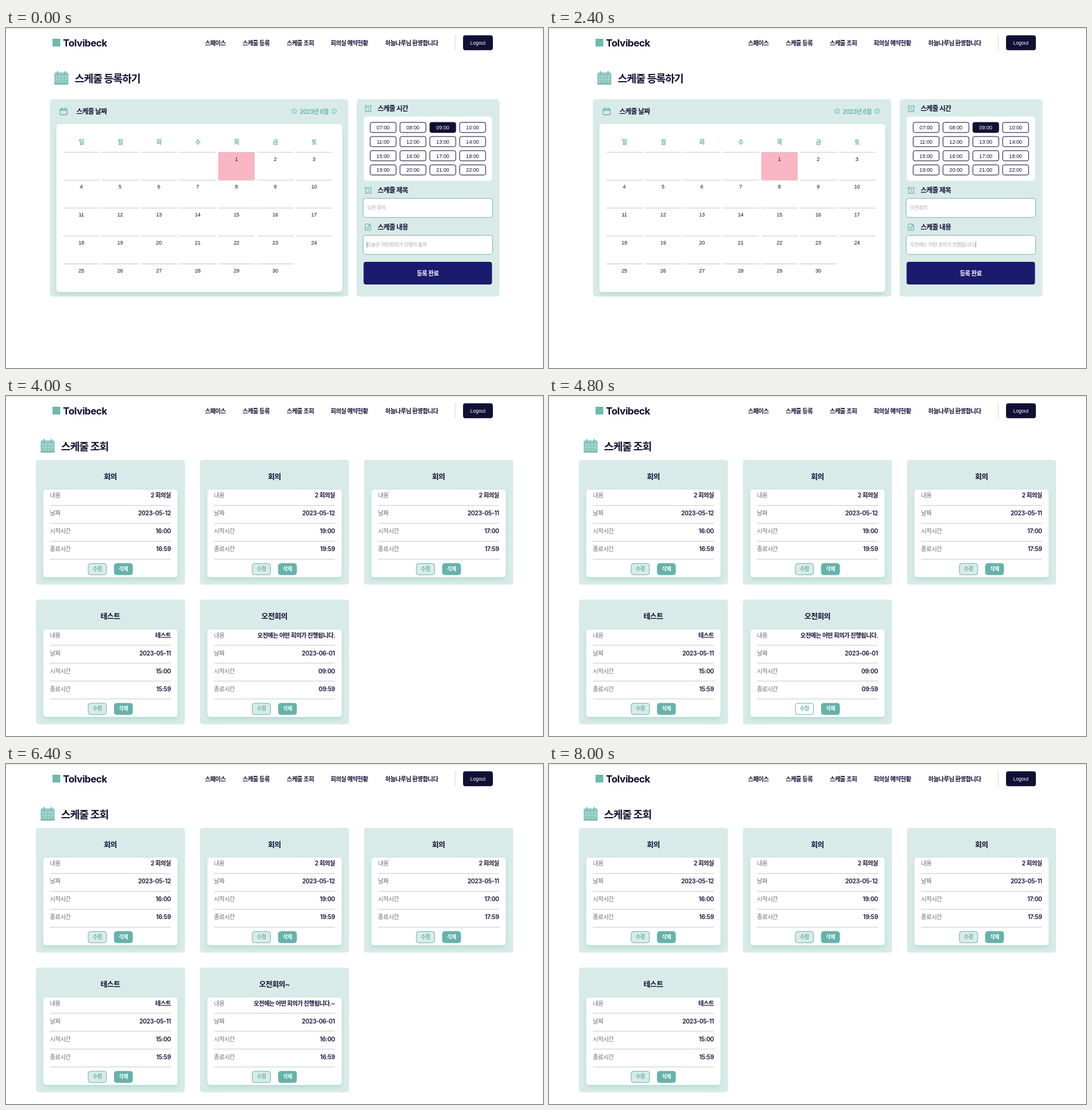
An HTML page that plays this animation: 900 by 570 pixels, repeating every 8.8 s.

```html
<!DOCTYPE html>
<html lang="ko">
<head>
<meta charset="utf-8">
<title>스케줄</title>
<style>
  html, body { margin: 0; width: 100%; height: 100%; overflow: hidden; background: #fff; }
  svg { display: block; width: 900px; height: 570px; }
  text { font-family: Inter, "Noto Sans CJK KR", "Noto Sans CJK", sans-serif; letter-spacing: -.03em; white-space: pre; }
  .ko { letter-spacing: -.053em; }
  .ui { font-family: "Liberation Sans", Arial, sans-serif; letter-spacing: 0; }
</style>
</head>
<body>
<svg id="stage" viewBox="0 0 900 570" xmlns="http://www.w3.org/2000/svg"></svg>
<script>
const NAVY = '#100f34', HOVER = '#1a1a6e', TEAL = '#66b2ab', MINT = '#d9ebe8', RULE = '#c8c8c8';
const STEP = 800;

// Text is placed by the middle of its line.
function text(x, cy, str, { size = 10, weight = 600, fill = NAVY, anchor = 'start', cls = '' } = {}) {
  const kind = cls || (/[가-힣]/.test(str) ? 'ko' : '');
  return `<text class="${kind}" x="${x}" y="${cy + size * .37}" font-size="${size}" font-weight="${weight}" fill="${fill}" text-anchor="${anchor}">${str}</text>`;
}
const mid = (x, cy, str, opt) => text(x, cy, str, { anchor: 'middle', ...opt });
const rect = (x, y, w, h, r, fill, extra = '') =>
  `<rect x="${x}" y="${y}" width="${w}" height="${h}" rx="${r}" fill="${fill}" ${extra}/>`;
const line = (x1, x2, y) => `<path d="M${x1} ${y}H${x2}" stroke="${RULE}"/>`;
const outline = (color, width = 1) => `stroke="${color}" stroke-width="${width}"`;
const move = (x, y, body) => `<g transform="translate(${x} ${y})">${body}</g>`;
const stroked = (d, width = 1.2) =>
  `<path d="${d}" fill="none" stroke="${TEAL}" stroke-width="${width}" stroke-linecap="round" stroke-linejoin="round"/>`;

function bigCalendar(x) {
  let dots = '';
  for (let r = 0; r < 3; r++)
    for (let c = 0; c < 4; c++)
      dots += `<circle cx="${4.2 + c * 5}" cy="${9.5 + r * 4.8}" r=".9" fill="#e4f3f0"/>`;
  return move(x, 72, rect(0, 2.5, 23.5, 20.5, 2.5, '#8ec8c1') + rect(0, 19, 23.5, 4, 2, '#7dbab3') +
    rect(4.6, 0, 1.8, 5, .9, TEAL) + rect(17.2, 0, 1.8, 5, .9, TEAL) + dots);
}
const smallCalendar = move(90.5, 134,
  stroked('M2 1.5H10Q12 1.5 12 3.5V9.5Q12 11.5 10 11.5H2Q0 11.5 0 9.5V3.5Q0 1.5 2 1.5ZM0 4H12M3 0V2M9 0V2', 1.3));
const alarm = cy => move(607, cy,
  `<circle cy=".5" r="4.6" fill="none" stroke="${TEAL}" stroke-width="1.1"/>` +
  stroked('M0 -2V.8L1.8 2M-6 -3.2L-3.4 -5.6M6 -3.2L3.4 -5.6M-3.6 4.2L-5 5.8M3.6 4.2L5 5.8', 1.1));
const note = move(602, 328.5,
  stroked('M1.5 0H6.5L9.5 3V9.5Q9.5 11 8 11H1.5Q0 11 0 9.5V1.5Q0 0 1.5 0ZM6.3 .2V3.2H9.2M2.5 5.6H7M2.5 8.2H7', 1.1));
const arrow = (x, dir) => move(x, 139.5,
  `<circle r="3.9" fill="none" stroke="${TEAL}" stroke-width=".9"/>` + stroked(`M${-dir * .7} -1.8L${dir} 0L${-dir * .7} 1.8`, .9));

function header() {
  const links = [[333.5, '스페이스'], [396.5, '스케줄 등록'], [470.5, '스케줄 조회'],
    [544, '회의실 예약현황'], [635.5, '하늘나루님 환영합니다']];
  return rect(78, 18, 13, 13, 0, '#6fb9ae') + text(95.5, 25, 'Tolvibeck', { size: 16.5, weight: 700 }) +
    links.map(([x, s]) => text(x, 25, s)).join('') +
    rect(752.5, 12, 1, 26, 0, '#d8d8d8') + rect(766, 12.3, 50, 25, 4, NAVY) +
    mid(790.8, 25, 'Logout', { size: 8.33, weight: 400, fill: '#fff', cls: 'ui' });
}

const heading = (x, str) => bigCalendar(x) + text(x + 34.3, 84.3, str, { size: 17.5 });

function monthPanel() {
  let out = rect(73.5, 119.3, 500.3, 331, 5, MINT) + smallCalendar + text(118, 140, '스케줄 날짜', { size: 11.25 }) +
    arrow(483, -1) + mid(516.3, 140, '2023년 6월', { fill: TEAL }) + arrow(550, 1) +
    rect(84.5, 161, 479, 281.5, 5, '#fff', 'filter="url(#shade)"');
  [...'일월화수목금토'].forEach((d, i) => out += mid(126.3 + 65 * i, 191.3, d, { fill: TEAL }));
  for (let i = 0; i < 34; i++) {
    const x = 96 + i % 7 * 65, y = 208.3 + Math.floor(i / 7) * 46.8, day = i - 3;
    if (day === 1) out += rect(x - .3, y, 61, 46.8, 0, '#f9b5c4');
    out += line(x, x + 61, y);
    if (day > 0) out += mid(x + 30.3, y + 11, day, { size: 8.75, weight: 400, fill: '#111', cls: 'ui' });
  }
  return out;
}

function field(y, str, caret) {
  return rect(598.5, y, 217, 32, 4, '#fff', outline('#83b3b0')) +
    text(605, y + 15.5, str, { size: 8.4, weight: 400, fill: '#a9a9ad' }) +
    (caret ? `<path data-caret="${caret}" d="M0 ${y + 10.5}v10" stroke="#555" stroke-width=".8"/>` : '');
}

// caret: 'start' or 'end' of the text
function form({ title = '스케줄 등록하기', hour = 9, name, body, nameCaret, bodyCaret, action = '등록 완료', hot }) {
  let out = header() + heading(81, title) + monthPanel() + rect(587.5, 119.3, 239.5, 331, 5, MINT) +
    alarm(135) + text(622.8, 135, '스케줄 시간', { size: 11.25 }) + rect(599.5, 148.5, 215, 107.5, 5, '#fff');
  for (let i = 0; i < 16; i++) {
    const x = 610.3 + i % 4 * 50, y = 158.2 + Math.floor(i / 4) * 23.75, on = i + 7 === hour;
    out += rect(x, y, 43.5, 17, 3, on ? NAVY : '#fff', outline(NAVY)) +
      mid(x + 21.7, y + 8.7, String(i + 7).padStart(2, '0') + ':00',
        { size: 8.75, weight: 400, fill: on ? '#fff' : NAVY, cls: 'ui' });
  }
  return out + alarm(272) + text(622.8, 272, '스케줄 제목', { size: 11.25 }) + field(285.6, name, nameCaret) +
    note + text(622.8, 334, '스케줄 내용', { size: 11.25 }) + field(347.6, body, bodyCaret) +
    rect(599.3, 392, 215.2, 38, 4, hot ? HOVER : NAVY) + mid(706.8, 410.8, action, { fill: '#fff' });
}

function button(x, y, w, h, str, solid, fill = solid ? TEAL : MINT) {
  return rect(x, y, w, h, 4, fill, outline(TEAL)) +
    mid(x + w / 2, y + h / 2 - .4, str, { size: 8.75, fill: solid ? '#fff' : TEAL });
}

function card(i, [title, body, date, hour], { editHot, removeFocus }) {
  let out = rect(0, 0, 250, 209.3, 5, MINT) + mid(124.8, 28.3, title, { size: 12.5 }) +
    rect(12.5, 50.2, 225, 146.5, 5, '#fff', 'filter="url(#shade)"');
  [['내용', body], ['날짜', date], ['시작시간', hour + ':00'], ['종료시간', hour + ':59']].forEach(([label, value], r) => {
    const cy = 59.7 + 30 * r;
    out += text(23.6, cy, label, { weight: 400, fill: '#6d6d80' }) +
      text(226.3, cy, value, { anchor: 'end' }) + line(23.6, 226.4, cy + 17);
  });
  out += button(87.8, 173.9, 30.5, 19, '수정', false, editHot ? '#fff' : MINT) + button(131.5, 173.9, 30.5, 19, '삭제', true);
  if (removeFocus) out += rect(131, 173.2, 31.5, 20.2, 4.5, 'none', outline('#1450d8', 1.6));
  return move(50 + i % 3 * 275, 106.9 + Math.floor(i / 3) * 234.3, out);
}

function list(items, { dx = 0, ...state } = {}) {
  const cards = items.map((it, i) => card(i, it, i === 4 ? state : {})).join('');
  return move(dx, 0, header() + heading(58, '스케줄 조회') + cards);
}

const confirmBox = rect(0, 0, 900, 570, 0, '#000', 'opacity=".6"') + rect(389.5, 239.8, 121, 112.4, 4, '#fff') +
  mid(448.8, 274.8, '삭제 하시겠습니까?', { size: 11.25 }) +
  button(400.4, 316.4, 46.2, 19.8, '네', true) + button(451, 316.4, 46.2, 19.8, '아니요', false);

const hint = '오늘은 어떤회의가 진행이 될까', plan = '오전에는 어떤 회의가 진행됩니다.';
const early = [
  ['s', 'g', '2023-05-06', 11], ['ss', 'zzzgs', '2023-05-05', 16], ['c', 'c', '2023-05-05', 15],
  ['g', 'gg', '2023-05-06', 16], ['회의', '2 회의실', '2023-05-12', 16], ['11', '11', '2023-05-03', 11]];
const late = [
  ['회의', '2 회의실', '2023-05-12', 16], ['회의', '2 회의실', '2023-05-12', 19],
  ['회의', '2 회의실', '2023-05-11', 17], ['테스트', '테스트', '2023-05-11', 15]];
const added = [...late, ['오전회의', plan, '2023-06-01', '09']];
const edited = [...late, ['오전회의~', plan + '~', '2023-06-01', 16]];

const scenes = [
  form({ name: '오전 회의', body: hint, bodyCaret: 'start', hot: true }),
  form({ name: '오전회의', body: hint, nameCaret: 'end' }),
  form({ name: '오전회의', body: '오전에는 어떤 회의', bodyCaret: 'end' }),
  form({ name: '오전회의', body: plan, bodyCaret: 'end', hot: true }),
  list(early, { dx: -4.5 }),
  list(added),
  list(added, { editHot: true }),
  form({ title: '스케줄 수정하기', hour: 16, name: '오전회의~', body: plan + '~', bodyCaret: 'end', action: '수정 완료', hot: true }),
  list(edited),
  list(edited, { removeFocus: true }) + confirmBox,
  list(late)
];

const stage = document.getElementById('stage');
stage.innerHTML = `<defs><filter id="shade" x="-10%" y="-10%" width="120%" height="125%">
  <feDropShadow dx="0" dy="4" stdDeviation="4" flood-color="${TEAL}" flood-opacity=".3"/></filter></defs>` +
  scenes.map(s => `<g class="scene">${rect(0, 0, 900, 1, 0, '#dcdcdc')}${s}</g>`).join('');

for (const caret of stage.querySelectorAll('[data-caret]')) {
  const width = caret.dataset.caret === 'end' ? caret.previousElementSibling.getComputedTextLength() + .8 : 0;
  caret.setAttribute('transform', `translate(${605 + width} 0)`);
}

const groups = [...stage.querySelectorAll('.scene')];
function draw() {
  const now = Math.floor(performance.now() % (STEP * groups.length) / STEP);
  groups.forEach((g, i) => g.style.display = i === now ? '' : 'none');
  requestAnimationFrame(draw);
}
draw();
</script>
</body>
</html>
```
